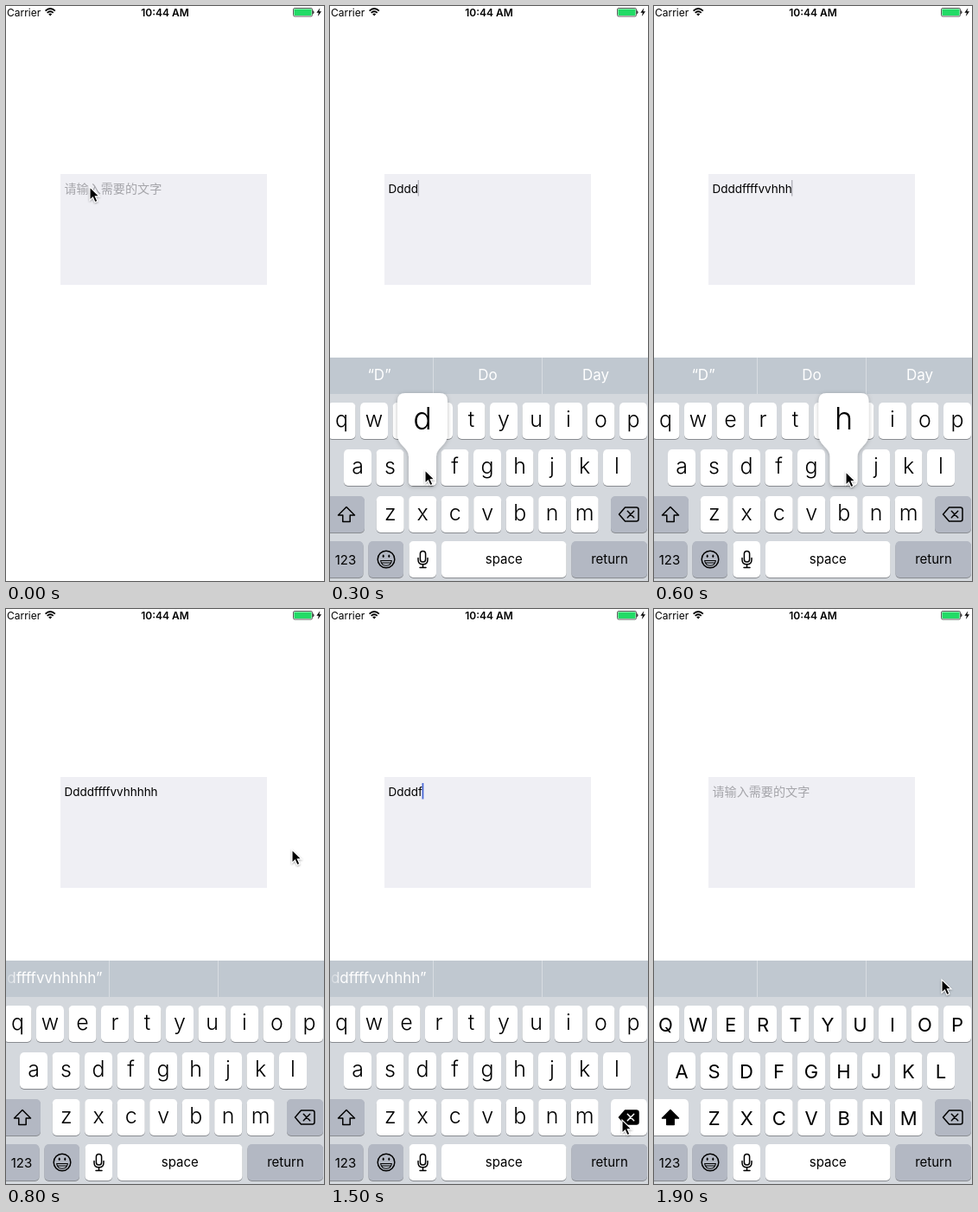
An HTML page that plays this animation: 368x664 px, repeating every 2 s.

```html
<!DOCTYPE html>
<html lang="en">
<head>
<meta charset="utf-8">
<title>Text field with placeholder</title>
<style>
html, body { margin: 0; width: 100%; height: 100%; overflow: hidden; background: #fff; }
svg { display: block; width: 368px; height: 664px; font-family: Inter, Roboto, sans-serif; }
text { white-space: pre; }
.mid { text-anchor: middle; }
.upper { font-size: 22px; }
.lower { font-size: 25px; font-weight: 300; }
.label { font-size: 15px; }
.hint { font-size: 17px; fill: #fff; }
.line { fill: none; stroke: #000; stroke-width: 1.5; stroke-linejoin: round; stroke-linecap: round; }
</style>
</head>
<body>
<svg id="stage" viewBox="0 0 368 664" xmlns="http://www.w3.org/2000/svg">
  <defs>
    <linearGradient id="fade" gradientUnits="userSpaceOnUse" x1="0" y1="0" x2="14" y2="0">
      <stop offset="0" stop-color="#fff" stop-opacity=".2"/>
      <stop offset=".5" stop-color="#fff" stop-opacity=".5"/>
      <stop offset="1" stop-color="#fff"/>
    </linearGradient>
    <filter id="soft" x="-30%" y="-30%" width="160%" height="160%">
      <feDropShadow dx="0" dy="1" stdDeviation="2.5" flood-opacity=".25"/>
    </filter>
    <filter id="drop" x="-50%" y="-50%" width="200%" height="200%">
      <feDropShadow dx="0" dy="1" stdDeviation=".9" flood-opacity=".4"/>
    </filter>
  </defs>
  <rect width="368" height="664" fill="#fff"/>

  <text x="1" y="11.5" font-size="12">Carrier</text>
  <g fill="none" stroke="#000" stroke-width="1.9">
    <path d="M45.6 5.6Q51.2 .6 56.8 5.6M47.7 7.9Q51.2 4.8 54.7 7.9"/>
    <path d="M49.2 9.3Q51.2 7.5 53.2 9.3L51.2 11.4Z" fill="#000" stroke="none"/>
  </g>
  <text class="mid" x="184" y="11.5" font-size="12" font-weight="600">10:44 AM</text>
  <rect x="332.5" y="2.5" width="22" height="9.5" rx="1.6" fill="#fff" stroke="#333" stroke-width=".8"/>
  <rect x="333.4" y="3.4" width="20.2" height="7.7" rx=".8" fill="#22db66"/>
  <path d="M355.5 5.5q1.6 1.7 0 3.4z" stroke="#222" stroke-width=".6"/>
  <path d="M363.3 2.3L359.4 7.7H361.9L360.8 12L365 6.3H362.4Z"/>

  <rect x="63" y="194" width="239" height="128" fill="#efeff4"/>
  <text id="holder" x="67.5" y="215.5" font-size="14.1" font-weight="300" fill="#a5a5aa"
    font-family="'Noto Sans CJK SC', 'Noto Sans CJK', sans-serif">请输入需要的文字</text>
  <text id="typed" x="67.5" y="215.5" font-size="13.5"></text>
  <rect id="caret" y="201" height="18.5"/>

  <g id="board">
    <rect y="406" width="368" height="258" fill="#d4d8dd"/>
    <rect y="406" width="368" height="42" fill="#c0c8d0"/>
    <path d="M119.5 406V448M245.5 406V448" stroke="#d8dde2"/>
    <g id="hints">
      <text class="hint mid" x="57" y="431.5">“D”</text>
      <text class="hint mid" x="182.5" y="431.5">Do</text>
      <text class="hint mid" x="307.5" y="431.5">Day</text>
    </g>
    <text id="long" class="hint" x="111.5" y="431.5" text-anchor="end" style="fill:url(#fade)"></text>
    <g id="keys"></g>
    <path id="arrow" class="line" d="M19 578.5L28.5 588H23.2V595.5H14.8V588H9.5Z"/>
    <path id="erase" class="line" d="M341.5 579H354.5Q357 579 357 581.5V592.5Q357 595 354.5 595H341.5L334.5 587Z"/>
    <path id="cross" class="line" d="M344.3 583.3L351.7 590.7M351.7 583.3L344.3 590.7"/>
    <g class="line" stroke-width="1.3">
      <circle cx="65" cy="639" r="9.8"/>
      <path d="M58.6 640.5H71.4Q70.4 646.3 65 646.3T58.6 640.5ZM59.5 643H70.5" stroke-width="1.1"/>
      <ellipse cx="61.7" cy="635.3" rx="1" ry="1.7" fill="#000" stroke="none"/>
      <ellipse cx="68.3" cy="635.3" rx="1" ry="1.7" fill="#000" stroke="none"/>
    </g>
    <g id="mic" class="line">
      <rect x="104.4" y="629.5" width="6.2" height="12.5" rx="3.1"/>
      <path d="M102 637.5V639.5Q102 644.8 107.5 644.8T113 639.5V637.5M107.5 645V648.5M104 648.5H111"/>
    </g>
    <g id="popup">
      <path id="bubble" fill="#fff" filter="url(#soft)"/>
      <text id="big" class="mid" font-size="36" font-weight="300"></text>
    </g>
  </g>

  <path id="mouse" d="M0 0V15.2L3.5 11.9L6 17.6L8.8 16.4L6.3 10.8H11Z" stroke="#fff" stroke-width="1.1" filter="url(#drop)"/>
</svg>
<script>
const $ = id => document.getElementById(id);
const GREY = '#b3b8c3', WHITE = '#fff', PITCH = 37.5;
const PHRASE = 'Ddddffffvvhhhhh';
const STEP = 100;

// letters typed, caret (0 none, 1 thin, 2 blue), pointer x, pointer y, pressed key
const poses = [
  [0, 0, 97, 209], [0, 1, 97, 209], [0, 1, 112, 147],
  [4, 1, 110, 536, 'd'], [8, 1, 149, 538, 'f'], [10, 1, 209, 558, 'v'],
  [13, 1, 222, 538, 'h'], [15, 1, 268, 440], [15, 0, 331, 278],
  [15, 0, 336, 330], [15, 2, 340, 470], [15, 2, 336, 625], [15, 0, 333, 587],
  [14, 2, 335, 588, 'del'], [9, 2, 338, 590, 'del'], [5, 2, 338, 590, 'del'],
  [2, 2, 338, 590, 'del'], [0, 2, 338, 590, 'del'],
  [0, 2, 338, 590], [0, 0, 333, 428]
];

function add(tag, attrs, text = '') {
  const el = document.createElementNS('http://www.w3.org/2000/svg', tag);
  set(el, attrs);
  el.textContent = text;
  $('keys').append(el);
  return el;
}

function set(el, attrs) {
  for (const name in attrs) el.setAttribute(name, attrs[name]);
}

function show(id, on) {
  $(id).style.display = on ? '' : 'none';
}

function makeKey(x, y, width, fill) {
  const box = { x, width, height: 42, rx: 5 };
  const shade = add('rect', { ...box, y: y + 1, fill: '#898c91' });
  const face = add('rect', { ...box, y, fill });
  return { shade, face };
}

const letters = {};
[['qwertyuiop', 13.5, 458], ['asdfghjkl', 32, 512], ['zxcvbnm', 69.7, 566]].forEach(([row, first, y]) => {
  [...row].forEach((ch, i) => {
    const x = first + i * PITCH;
    makeKey(x - 16, y, 32, WHITE);
    letters[ch] = { x, y, label: add('text', { x }) };
  });
});

const shift = makeKey(-4, 566, 44, GREY);
const del = makeKey(325, 566, 42, GREY);
makeKey(-4, 618, 42.5, GREY);
makeKey(44.5, 618, 40.5, GREY);
const micKey = makeKey(91.5, 618, 31.5, WHITE);
const space = makeKey(129, 618, 144.5, WHITE);
makeKey(279.5, 618, 87.5, GREY);
add('text', { class: 'label mid', x: 18, y: 645 }, '123');
add('text', { class: 'label mid', x: 323.5, y: 644 }, 'return');
const spaceLabel = add('text', { class: 'label mid', y: 644 }, 'space');

function drawKeys(caps, mic) {
  for (const ch in letters) {
    const { y, label } = letters[ch];
    label.textContent = caps ? ch.toUpperCase() : ch;
    set(label, { class: 'mid ' + (caps ? 'upper' : 'lower'), y: y + (caps ? 29.5 : 27.5) });
  }
  set(shift.face, { fill: caps ? WHITE : GREY });
  $('arrow').style.fill = caps ? '#000' : 'none';
  for (const part of [micKey.shade, micKey.face]) part.style.display = mic ? '' : 'none';
  show('mic', mic);
  const left = mic ? 129 : 91.5;
  for (const part of [space.shade, space.face]) set(part, { x: left, width: 273.5 - left });
  set(spaceLabel, { x: (left + 273.5) / 2 });
}

function drawPopup(ch) {
  const key = letters[ch];
  show('popup', key);
  if (!key) return;
  const { x, y } = key;
  const l = x - 29, r = x + 29, a = x - 16, b = x + 16;
  set($('bubble'), {
    d: `M${a} ${y + 37}V${y + 8}C${a} ${y - 2} ${l} ${y - 5} ${l} ${y - 17}V${y - 56}` +
       `Q${l} ${y - 65} ${l + 9} ${y - 65}H${r - 9}Q${r} ${y - 65} ${r} ${y - 56}V${y - 17}` +
       `C${r} ${y - 5} ${b} ${y - 2} ${b} ${y + 8}V${y + 37}` +
       `Q${b} ${y + 42} ${b - 5} ${y + 42}H${a + 5}Q${a} ${y + 42} ${a} ${y + 37}Z`
  });
  set($('big'), { x, y: y - 23 });
  $('big').textContent = ch;
}

function draw(time) {
  const step = Math.floor(time / STEP) % poses.length;
  const [count, caret, x, y, pressed] = poses[step];
  const erasing = pressed === 'del';

  show('holder', count === 0);
  $('typed').textContent = PHRASE.slice(0, count);
  const end = count ? 67.5 + $('typed').getComputedTextLength() : 66.5;
  show('caret', caret);
  set($('caret'), caret === 2
    ? { x: end - .5, width: 1.8, fill: '#4a69d6' }
    : { x: end - .3, width: .9, fill: '#92929c' });

  show('board', step > 0);
  drawKeys(count === 0, step > 2);
  drawPopup(pressed);
  show('hints', count > 0 && step < 7);
  show('long', count > 0 && step >= 7);
  $('long').textContent = PHRASE.slice(step < 13 ? 4 - 1 : 2, step < 13 ? 15 : 14) + '”';

  set(del.face, { fill: erasing ? WHITE : GREY });
  $('erase').style.fill = erasing ? '#000' : 'none';
  $('cross').style.stroke = erasing ? WHITE : '#000';
  set($('mouse'), { transform: `translate(${x} ${y})` });
}

const start = performance.now();
function tick() {
  draw(performance.now() - start);
  requestAnimationFrame(tick);
}
tick();
</script>
</body>
</html>
```
